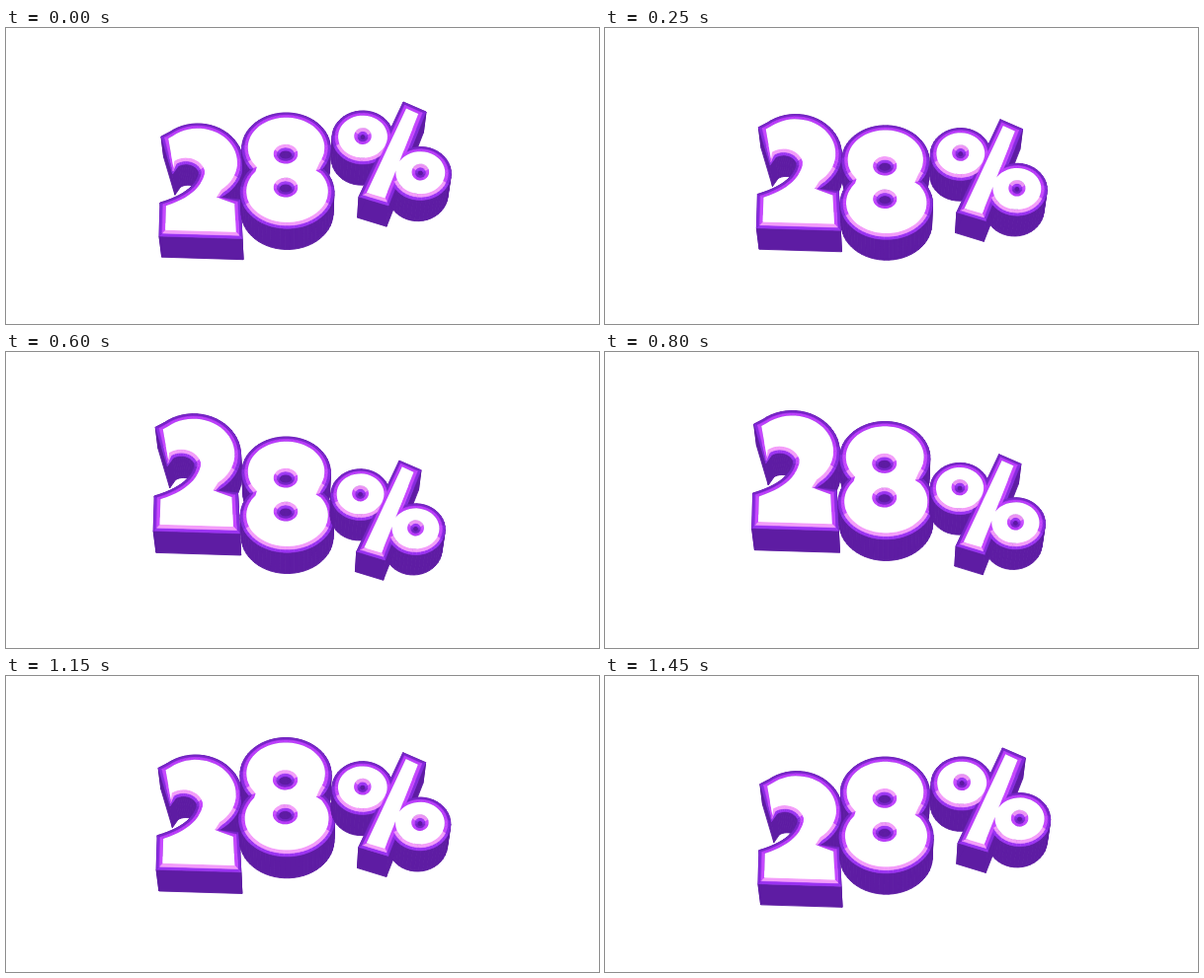
These frames come from a looping animation (600 by 300 pixels, 1500 ms). An HTML page with a canvas:

```html
<!DOCTYPE html>
<html lang="en">
<head>
<meta charset="utf-8">
<title>28%</title>
<style>
html, body { margin: 0; width: 100%; height: 100%; overflow: hidden; background: #fff; }
canvas { display: block; }
</style>
</head>
<body>
<canvas id="stage" width="600" height="300" role="img" aria-label="28%"></canvas>
<script>
const ctx = document.getElementById('stage').getContext('2d');
const LOOP = 1500, STEP = 50;
const VANISH = { x: 300, y: 950 };   // the glyphs bob towards and away from this point
const SWING = 0.0222, LAG = 72;      // bobbing strength, phase lag per glyph in degrees
const DEPTH = 21.2, TAPER = 0.02, SQUASH = 0.93;
const BEVEL = 6, BAND = 2.9, RISE = 0.15;
const WALL = '#5e1ca3', FACE = '#fff';
// bevel colours for edges that face up, sideways and down
const OUTER = ['#7826c8', '#872bde', '#9a32f2'];
const INNER = ['#bd3efc', '#c648ff', '#f39cf9'];

const wave = deg => Math.cos(deg * Math.PI / 180);

function sample(n, fn) {
  return Array.from({ length: n }, (_, i) => fn(i / (n - 1)));
}

function arc(cx, cy, rx, ry, from, to, n = 32) {
  return sample(n, t => {
    const deg = from + (to - from) * t;
    return [cx + rx * wave(deg), cy + ry * wave(deg - 90)];
  });
}

function curve([ax, ay], [bx, by], [cx, cy]) {
  const mix = (a, b, c, t) => a * (1 - t) ** 2 + 2 * b * t * (1 - t) + c * t * t;
  return sample(14, t => [mix(ax, bx, cx, t), mix(ay, by, cy, t)]);
}

// Outlines run clockwise and holes the other way, so the body is always on the right.
const disc = (cx, cy, rx, ry) => arc(cx, cy, rx, ry, 0, 352, 45);
const hole = (...args) => disc(...args).reverse();
const ring = (cx, cy) => [disc(cx, cy, 31, 27), hole(cx, cy - 0.5, 2.8, 2.8)];

const two = [
  [157, 110],
  ...arc(194, 137, 46, 40, -128, 60),
  [237, 174], [239, 213.5], [155, 211],
  ...curve([156, 177], [190, 167], [195, 148]),
  ...arc(182, 149, 13.5, 11, -15, -125, 14),
  [168.5, 148]
];

const eight = [
  ...arc(283.5, 122, 44.8, 36, 144, 396, 44),
  ...arc(284.5, 166.3, 47.4, 37, -38, 218, 44)
];

const slash = [[402, 75], [425, 85], [387, 180], [357, 171]];

const glyphs = [
  [two],
  [eight, ...[128.5, 162.5].map(y => hole(283, y, 6.3, 4.3))],
  [...ring(361, 111), slash, ...ring(419.3, 147.5)]
].map(shapes => shapes.map(solid));

function solid(pts) {
  const n = pts.length;
  const normals = pts.map(([x, y], i) => {
    const [nx, ny] = pts[(i + 1) % n];
    const len = Math.hypot(nx - x, ny - y);
    return [(y - ny) / len, (nx - x) / len];
  });
  const inset = d => pts.map(([x, y], i) => {
    const a = normals[(i + n - 1) % n], b = normals[i];
    const k = Math.max(0.9, 1 + a[0] * b[0] + a[1] * b[1]);   // limits sharp miters
    return [x + (a[0] + b[0]) / k * d, y + (a[1] + b[1]) / k * d * SQUASH - RISE * d];
  });
  return {
    base: pts.map(([x, y]) => [x + (VANISH.x - 10 - x) * TAPER, y + DEPTH]),
    edge: pts,
    band: inset(BAND),
    face: inset(BEVEL),
    shade: normals.map(([, ny]) => ny < -0.45 ? 2 : ny < 0.15 ? 1 : 0)
  };
}

function trace(pts) {
  pts.forEach(([x, y], i) => i ? ctx.lineTo(x, y) : ctx.moveTo(x, y));
  ctx.closePath();
}

// Fills the strip between two matching outlines.
function strip(a, b, colour) {
  a.forEach((p, i) => {
    const j = (i + 1) % a.length;
    ctx.fillStyle = ctx.strokeStyle = colour(i);
    ctx.beginPath();
    trace([p, a[j], b[j], b[i]]);
    ctx.fill();
    ctx.stroke();
  });
}

function drawGlyph(shapes, index, angle) {
  const lag = index * LAG;
  const s = 1 + SWING * (wave(lag) - wave(angle - lag));
  ctx.save();
  ctx.translate(VANISH.x, VANISH.y);
  ctx.scale(s, s);
  ctx.translate(-VANISH.x, -VANISH.y);
  ctx.lineWidth = 0.9;
  for (const p of shapes) strip(p.base, p.edge, () => WALL);
  ctx.lineWidth = 0.5;
  for (const p of shapes) strip(p.edge, p.band, i => OUTER[p.shade[i]]);
  for (const p of shapes) strip(p.band, p.face, i => INNER[p.shade[i]]);
  ctx.fillStyle = FACE;
  ctx.beginPath();
  for (const p of shapes) trace(p.face);
  ctx.fill();
  ctx.restore();
}

function draw(ms) {
  const t = Math.floor((ms % LOOP) / STEP) * STEP;
  ctx.clearRect(0, 0, 600, 300);
  ctx.lineJoin = 'round';
  glyphs.forEach((shapes, i) => drawGlyph(shapes, i, t / LOOP * 360));
}

let start;
function tick(now) {
  start ??= now;
  draw(now - start);
  requestAnimationFrame(tick);
}
draw(0);
requestAnimationFrame(tick);
</script>
</body>
</html>
```
